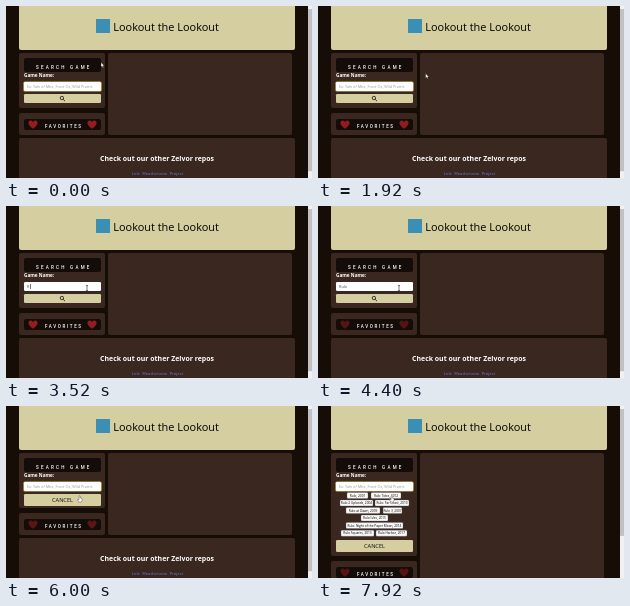
An HTML page that plays this animation: 306x172 px, repeating every 8 s.

```html
<!DOCTYPE html>
<html lang="en">
<head>
<meta charset="utf-8">
<title>Lookout the Lookout</title>
<style>
html, body { margin: 0; width: 100%; height: 100%; overflow: hidden; background: #160d07; }
svg { display: block; width: 100%; height: 100%; font-family: "Open Sans", "Noto Sans", sans-serif; }
.panel { fill: #3a2820; }
.dark { fill: #140c08; }
.sand { fill: #d5cea0; }
.label { font: 500 4.5px "Roboto", sans-serif; fill: #fff; letter-spacing: 2.25px; }
.tight { letter-spacing: 1.65px; }
.mid { text-anchor: middle; }
.heart { fill: #961d1f; }
</style>
</head>
<body>
<svg viewBox="0 0 306 172" xmlns="http://www.w3.org/2000/svg">
  <defs>
    <clipPath id="window"><rect id="slot" x="13" y="86" width="86" height="0"/></clipPath>
    <path id="heart" class="heart" d="M0 4.3C-2.2 2.3-4.6.6-4.6-1.6C-4.6-4.5-1.2-5 0-2.4C1.2-5 4.6-4.5 4.6-1.6C4.6.6 2.2 2.3 0 4.3Z"/>
  </defs>

  <rect width="306" height="172" fill="#160d07"/>
  <path class="sand" d="M13 0H289V42Q289 44 287 44H15Q13 44 13 42Z"/>
  <rect x="90" y="13" width="14" height="14" fill="#3b8fb5"/>
  <text x="107.3" y="24.8" font-size="10.95" fill="#000">Lookout the Lookout</text>

  <rect id="stage" class="panel" x="102" y="47" width="184" height="82" rx="2"/>
  <rect id="search" class="panel" x="13" y="47" width="86" height="55" rx="2"/>
  <rect class="dark" x="18" y="52" width="77" height="14" rx="2"/>
  <text class="label" x="30" y="63">SEARCH GAME</text>
  <text x="18" y="71.4" font-size="4.7" font-weight="700" fill="#fff">Game Name:</text>

  <rect id="glow" x="17.4" y="75.4" width="78.2" height="10.2" rx="1.6" fill="#d9bf5c"/>
  <rect x="18" y="76" width="77" height="9" rx="1.2" fill="#fff"/>
  <text id="hint" x="21" y="82" font-size="3.8" fill="#999">Ex: Tale of Mire, Frost Ox, Wild Prairie</text>
  <text id="typed" x="21" y="82" font-size="3.9" fill="#4a4a4a"></text>
  <rect id="caret" y="78" width=".6" height="5" fill="#222"/>

  <g id="find">
    <rect class="sand" x="18" y="88" width="77" height="9" rx="1.2"/>
    <g fill="none" stroke="#1c1510" stroke-width=".8"><circle cx="55.9" cy="92" r="1.7"/><path d="M57.2 93.3L59 95.1"/></g>
  </g>
  <g id="results" clip-path="url(#window)"></g>
  <g id="cancel">
    <rect class="sand" x="18" y="88" width="77" height="12" rx="1.2"/>
    <text class="mid" x="56.5" y="96" font-size="5.6" fill="#0e0a07">CANCEL</text>
  </g>

  <g id="below">
    <rect class="panel" x="13" y="107" width="86" height="22" rx="2"/>
    <rect class="dark" x="18" y="113" width="77" height="11" rx="2"/>
    <text class="label tight" x="39" y="121.8">FAVORITES</text>
    <g id="hearts"><use href="#heart" x="27" y="118.5"/><use href="#heart" x="86" y="118.5"/></g>
    <path class="panel" d="M15 132H287Q289 132 289 134V172H13V134Q13 132 15 132Z"/>
    <text class="mid" x="151" y="154.6" font-size="6.95" font-weight="700" fill="#fff">Check out our other Zelvor repos</text>
    <text class="mid" x="151.5" y="169.4" font-size="4.2" fill="#6674d8" xml:space="preserve">Link  Weathernote  Project</text>
  </g>

  <rect x="302" width="4" height="172" fill="#f1f1f1"/>
  <rect id="thumb" x="302" y="3" width="4" height="161" fill="#c1c1c1"/>

  <g id="pointer">
    <path id="arrow" d="M0 0V4.6L1.1 3.6L1.9 5.2L2.7 4.8L1.9 3.3H3.3Z" fill="#fff" stroke="#111" stroke-width=".35"/>
    <path id="beam" d="M-1-2.5H1M0-2.5V2.5M-1 2.5H1" fill="none" stroke="#222" stroke-width=".6"/>
    <path id="hand" d="M-.4-2.2Q.3-2.8.7-2.1V0L2.5.5V2.5L1.8 4H-.8L-2 1.6Q-1.7.8-.4 1.7Z" fill="#fff" stroke="#222" stroke-width=".35"/>
  </g>
</svg>
<script>
const LOOP = 8000, PULSE = 1760, GROW = 48, VIEW = 172, PAGE = 178;
const OPEN = 6000, OPENED = 6400;
const WORD = "Rulo", KEYS = [3440, 3760, 4000, 4240];
// time, x, y
const PATH = [[0, 95, 56.5], [160, 95, 56.5], [880, 117, 62.5], [1680, 117, 62.5], [2400, 81, 82], [4560, 81, 82], [5040, 73.5, 92]];
// y, then x, width, text per choice
const ROWS = [
  [86.4, [29, 21, "Rulo, 2001"], [53, 30, "Rulo Tides, 2012"]],
  [93.9, [22, 33, "Rulo 2 Uplands, 2004"], [57, 34, "Rulo: Far Coast, 2010"]],
  [101.4, [28, 34, "Rulo at Dawn, 2009"], [65, 19, "Rulo 3, 2007"]],
  [109, [43, 27, "Rulo Isles, 2015"]],
  [116.6, [28, 57, "Rulo: Night of the Paper Moon, 2014"]],
  [124.2, [23, 33, "Rulo Squares, 2013"], [58, 31, "Rulo Harbor, 2017"]]
];

const el = id => document.getElementById(id);
const set = (id, name, value) => el(id).setAttribute(name, value);
const show = (id, on) => set(id, "visibility", on ? "visible" : "hidden");
const clamp = v => Math.max(0, Math.min(1, v));
const ease = v => v * v * (3 - 2 * v);

el("results").innerHTML = ROWS.map(([y, ...items]) => items.map(([x, w, label]) =>
  `<rect x="${x}" y="${y}" width="${w}" height="6" rx="1" fill="#fafafa" stroke="#555" stroke-width=".3"/>` +
  `<text class="mid" x="${x + w / 2}" y="${y + 4.2}" font-size="3.2" fill="#000">${label}</text>`
).join("")).join("");

function pointAt(t) {
  const i = PATH.findIndex(p => p[0] > t);
  if (i < 0) return PATH[PATH.length - 1].slice(1);
  const [a, x, y] = PATH[i - 1], [b, u, v] = PATH[i];
  const k = ease((t - a) / (b - a));
  return [x + (u - x) * k, y + (v - y) * k];
}

function draw(t) {
  const open = t >= OPEN;
  const grow = GROW * ease(clamp((t - OPEN) / (OPENED - OPEN)));
  const [x, y] = pointAt(t);
  const inField = y > 76 && y < 85 && x < 95;
  const onButton = y >= 87 && x < 95;

  set("pointer", "transform", `translate(${x} ${y})`);
  show("beam", inField);
  show("hand", onButton);
  show("arrow", !inField && !onButton);
  set("glow", "opacity", inField ? 0 : 1);

  const count = open ? 0 : KEYS.filter(k => k <= t).length;
  el("typed").textContent = WORD.slice(0, count);
  show("hint", count === 0);
  const caretX = 21.6 + (count ? el("typed").getComputedTextLength() : 0);
  set("caret", "x", caretX);
  show("caret", t > 3000 && t < 4800 && (t - 3440) % 1000 < 500);

  show("find", !open);
  show("cancel", open);
  show("results", open);
  set("slot", "height", grow);
  set("cancel", "transform", `translate(0 ${grow * 46 / GROW})`);
  set("below", "transform", `translate(0 ${grow})`);
  set("search", "height", 55 + grow);
  set("stage", "height", 82 + grow);
  set("thumb", "height", VIEW * VIEW / (PAGE + grow) - 4);
  set("hearts", "opacity", 0.75 + 0.25 * Math.cos(2 * Math.PI * t / PULSE));
}

function tick(now) {
  draw(now % LOOP);
  requestAnimationFrame(tick);
}
draw(0);
requestAnimationFrame(tick);
</script>
</body>
</html>
```
